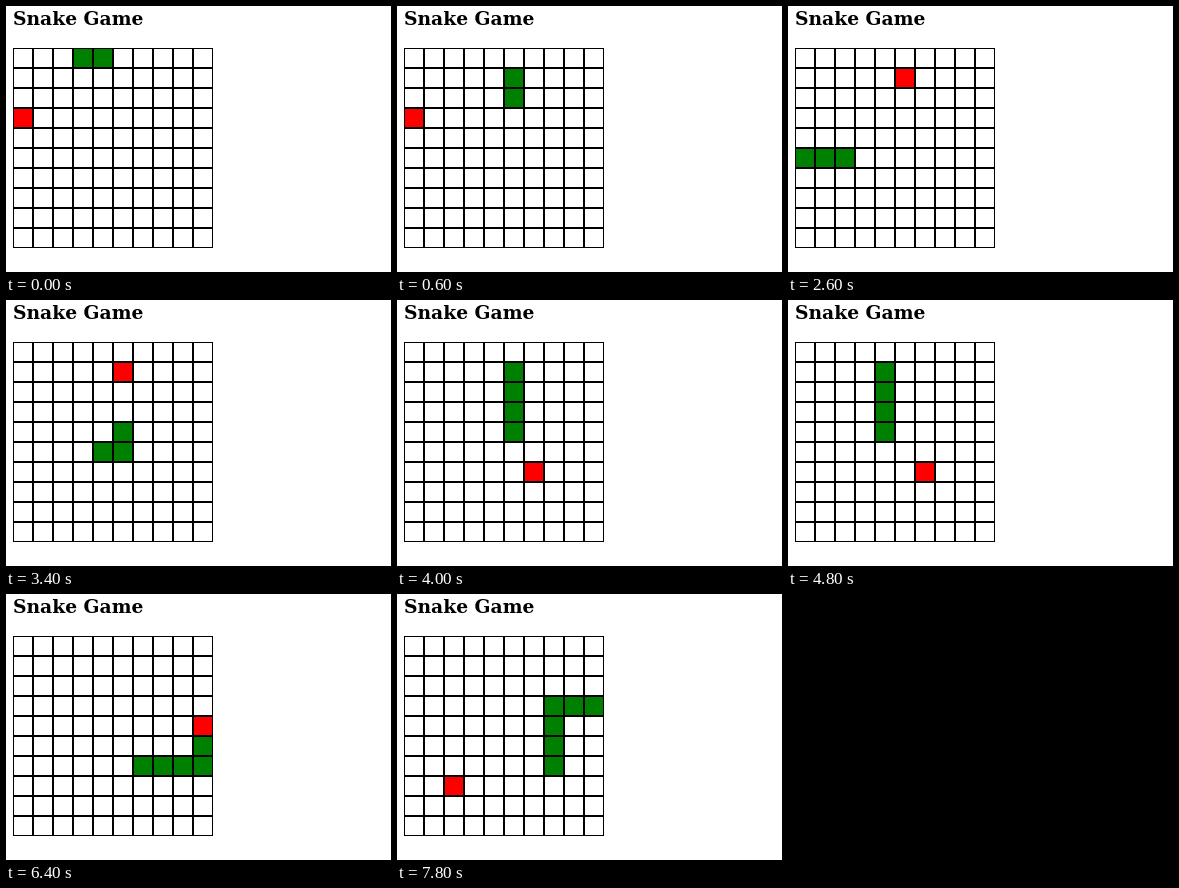
An HTML page that plays this animation: 385 by 266 pixels, repeating every 8 s.

```html
<!DOCTYPE html>
<html lang="en">
<head>
<meta charset="utf-8">
<title>Snake Game</title>
<style>
  html, body { margin: 0; width: 100%; height: 100%; overflow: hidden; background: #fff; }
  svg { display: block; }
  text { font: bold 18.72px "DejaVu Serif", serif; }
  rect { stroke: #000; stroke-width: 1; shape-rendering: crispEdges; }
</style>
</head>
<body>
<svg width="385" height="266" viewBox="0 0 385 266">
  <text x="7" y="19">Snake Game</text>
  <g id="board" transform="translate(7 42)"></g>
</svg>
<script>
const SIZE = 10, CELL = 20, STEP = 200, LOOP = 8000;
const DIRS = { R: [1, 0], L: [-1, 0], U: [0, -1], D: [0, 1] };
const ROUTE = 'R2 D3 L5 D2 R5 U4 L1 D5 R5 U3 L2 D3';
const MEALS = [[0, 3], [5, 1], [6, 6], [9, 4], [2, 7]];

const index = ([x, y]) => y * SIZE + x;

// Every cell the head visits, in order
const trail = [[3, 0]];
for (const leg of ROUTE.split(' ')) {
  const [dx, dy] = DIRS[leg[0]];
  for (let n = +leg.slice(1); n > 0; n--) {
    const [x, y] = trail[trail.length - 1];
    trail.push([x + dx, y + dy]);
  }
}
const path = trail.map(index);
const meals = MEALS.map(index);

// Food eaten after each step; the snake grows by one per meal
let eaten = 0;
const score = path.slice(1).map(head => head === meals[eaten] ? ++eaten : eaten);

const board = document.getElementById('board');
const cells = Array.from({ length: SIZE * SIZE }, (_, i) => {
  const cell = document.createElementNS(board.namespaceURI, 'rect');
  cell.setAttribute('x', i % SIZE * CELL + 0.5);
  cell.setAttribute('y', Math.floor(i / SIZE) * CELL + 0.5);
  cell.setAttribute('width', CELL - 1);
  cell.setAttribute('height', CELL - 1);
  return board.appendChild(cell);
});

function draw(time) {
  const step = Math.floor(time % LOOP / STEP);
  const end = step + 2;
  const snake = path.slice(end - 2 - score[step], end);
  const food = meals[score[step]];
  cells.forEach((cell, i) => {
    cell.setAttribute('fill', snake.includes(i) ? '#008000' : i === food ? '#f00' : '#fff');
  });
}

const start = performance.now();
function tick() {
  draw(performance.now() - start);
  requestAnimationFrame(tick);
}
tick();
</script>
</body>
</html>
```
